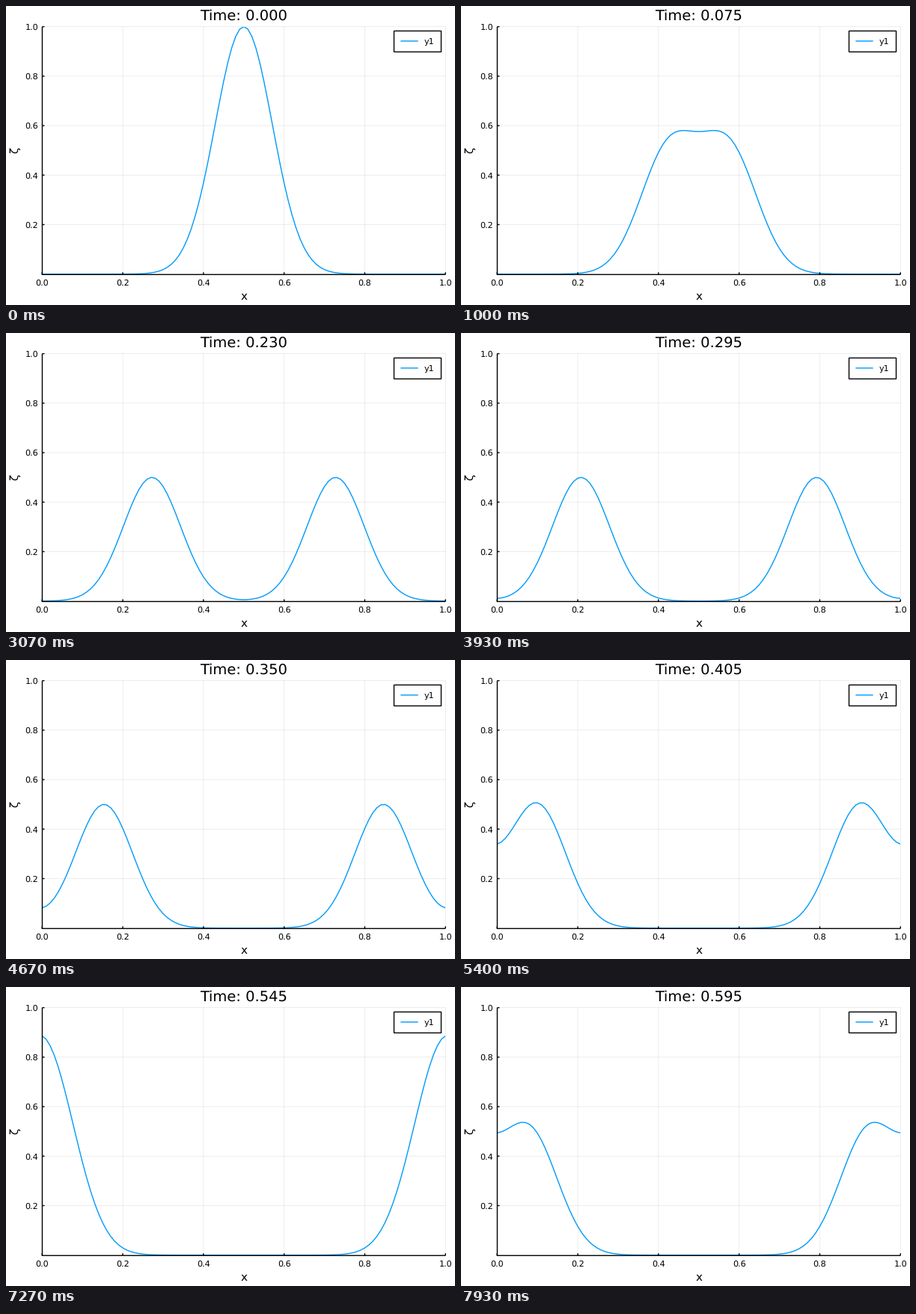
Write a matplotlib script that moves like this. It is 600 px wide and 400 px high and loops after 8 s.

```python
import numpy as np
import matplotlib.pyplot as plt
from matplotlib.animation import FuncAnimation
from matplotlib.lines import Line2D
from matplotlib.patches import Rectangle

W, H, DPI = 600, 400, 100
LOOP_MS, TICK_MS = 8000, 20
STEP_MS = LOOP_MS / 120    # the wave advances once per step
DT = 0.005
SPEED = 0.99
WALL = 0.005               # walls sit half a cell outside the plotted range
LEFT, RIGHT, TOP, BOTTOM = 48.25, 587.25, 27.65, 358.65
BLUE = "#009afa"

plt.rcParams.update({"font.family": "DejaVu Sans", "text.hinting": "none",
                     "text.hinting_factor": 8, "text.kerning_factor": 10,
                     "path.snap": False})

x = np.linspace(0, 1, 101)


def pulse(center):
    return 0.5 * np.exp(-100 * (x - center) ** 2)


def wave(t):
    """Two half pulses running apart, each mirrored at its wall."""
    a, b = 0.5 - SPEED * t, 0.5 + SPEED * t
    return pulse(a) + pulse(b) + pulse(-2 * WALL - a) + pulse(2 + 2 * WALL - b)


fig = plt.figure(figsize=(W / DPI, H / DPI), dpi=DPI, facecolor="white")
ax = fig.add_axes([LEFT / W, 1 - BOTTOM / H,
                   (RIGHT - LEFT) / W, (BOTTOM - TOP) / H])
ax.set(xlim=(0, 1), ylim=(0, 1))
ax.axis("off")


def label(px, py, text, size, **kw):
    return fig.text(px / W, 1 - py / H, text, fontsize=size, color="black", **kw)


def stroke(xs, ys, **kw):
    """Line in stage pixels, measured from the top left."""
    line = Line2D(np.array(xs) / W, 1 - np.array(ys) / H,
                  transform=fig.transFigure, clip_on=False, **kw)
    ax.add_line(line)


grid = dict(color="black", alpha=0.1, lw=0.5, zorder=0.5)
solid = dict(color="black", lw=1, zorder=4, solid_capstyle="butt")
axis_x, axis_y = LEFT + 0.2, BOTTOM + 0.6

for v in np.linspace(0, 1, 6):
    px = LEFT + v * (RIGHT - LEFT)
    py = BOTTOM - v * (BOTTOM - TOP)
    stroke([px, px], [TOP, BOTTOM], **grid)
    stroke([px, px], [axis_y - 3, axis_y], **solid)
    label(px, 374, f"{v:.1f}", 8, ha="center", va="baseline")
    if v > 0:
        stroke([LEFT, RIGHT], [py, py], **grid)
        stroke([axis_x, axis_x + 3], [py, py], **solid)
        label(43, py + 4.2, f"{v:.1f}", 8, ha="right", va="baseline")

stroke([axis_x, axis_x], [TOP, axis_y + 0.7], **solid)
stroke([axis_x, RIGHT], [axis_y, axis_y], **solid)

mid = (LEFT + RIGHT) / 2
title = label(mid, 19, "", 14, ha="center", va="baseline")
label(mid, 393, "x", 11, ha="center", va="baseline")
label(11.5, 193, "ζ", 11, ha="center", va="center", rotation=90)

curve, = ax.plot(x, wave(0), color=BLUE, lw=1, zorder=3)

ax.add_patch(Rectangle((518.5 / W, 1 - 61.4 / H), 63 / W, 28 / H,
                       transform=fig.transFigure, fc="white", ec="black",
                       lw=1, zorder=5, clip_on=False))
stroke([528, 550], [46.9, 46.9], color=BLUE, lw=1, zorder=6)
label(559, 51, "y1", 8, ha="left", va="baseline")


def update(i):
    # a step may fall inside a tick, so look a little past its middle
    t = int((i * TICK_MS + 14) / STEP_MS) * DT
    curve.set_ydata(wave(t))
    title.set_text(f"Time: {t:.3f}")
    return curve, title


anim = FuncAnimation(fig, update, frames=LOOP_MS // TICK_MS, interval=TICK_MS,
                     repeat=True, repeat_delay=0, blit=False)
plt.show()
```
